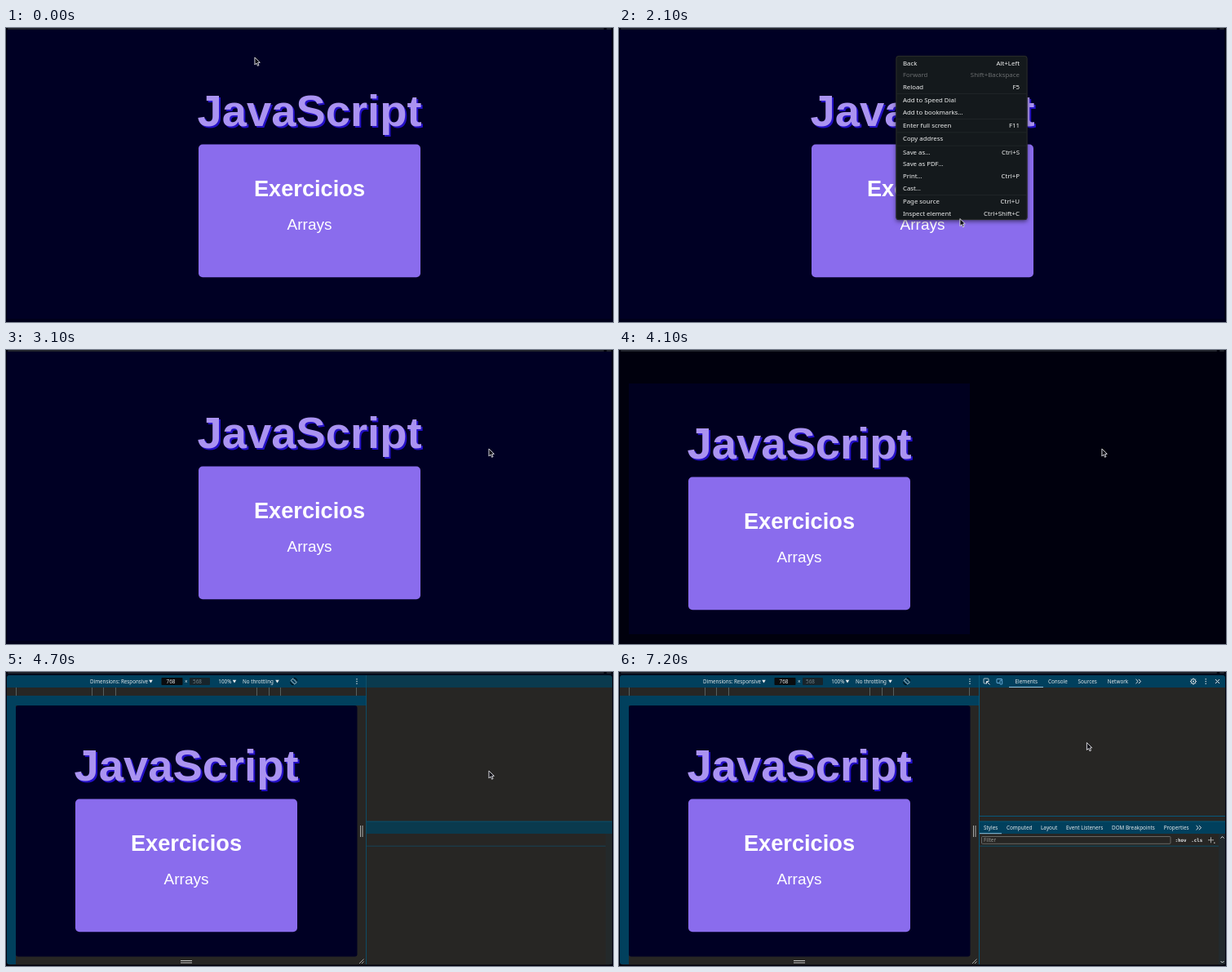
These frames come from a looping animation (744x360 px, 8000 ms). An HTML page with a canvas:

```html
<!DOCTYPE html>
<html lang="en">
<head>
<meta charset="utf-8">
<title>Opening the inspector</title>
<style>
html, body { margin: 0; width: 100%; height: 100%; overflow: hidden; background: #000024; }
canvas { display: block; }
</style>
</head>
<body>
<canvas id="stage" width="744" height="360"></canvas>
<script>
const ctx = document.getElementById('stage').getContext('2d');
const LOOP = 8000, STEP = 100;
const NAVY = '#000024', TEAL = '#01405d', GRAY = '#272624', LINE = '#07587b';
const SANS = '"Liberation Sans", Arial, sans-serif';
const UI = '"Noto Sans", "Open Sans", sans-serif';
const MONO = '"DejaVu Sans Mono", monospace';

const cursorPath = [
  [0, 304.5, 35.5], [100, 310, 49], [200, 328, 84], [300, 339, 105],
  [900, 339, 105], [1600, 414, 250], [1700, 414, 250], [1800, 418, 244],
  [2000, 418, 244], [2100, 417.5, 233], [2200, 417.5, 233], [2600, 591.5, 120.5],
  [7100, 591.5, 120.5], [7200, 573, 86], [8000, 573, 86]
];

const menu = [
  ['Back', 'Alt+Left', 43], ['Forward', 'Shift+Backspace', 57.5], ['Reload', 'F5', 72],
  ['Add to Speed Dial', '', 88.5], ['Add to bookmarks…', '', 103],
  ['Enter full screen', 'F11', 119.3], ['Copy address', '', 135.6],
  ['Save as…', 'Ctrl+S', 152], ['Save as PDF…', '', 166.6], ['Print…', 'Ctrl+P', 181.2],
  ['Cast…', '', 196], ['Page source', 'Ctrl+U', 212], ['Inspect element', 'Ctrl+Shift+C', 226.7]
];

const ramp = (t, from, to) => Math.max(0, Math.min(1, (t - from) / (to - from)));

function rect(x, y, w, h, fill, r = 0) {
  ctx.fillStyle = fill;
  ctx.beginPath();
  ctx.roundRect(x, y, w, h, r);
  ctx.fill();
}

function frame(x, y, w, h, color, r = 0) {
  ctx.strokeStyle = color;
  ctx.lineWidth = 0.8;
  ctx.beginPath();
  ctx.roundRect(x, y, w, h, r);
  ctx.stroke();
}

function line(points, color = '#dfe3e6', width = 1) {
  ctx.strokeStyle = color;
  ctx.lineWidth = width;
  ctx.beginPath();
  points.forEach(([x, y], i) => i ? ctx.lineTo(x, y) : ctx.moveTo(x, y));
  ctx.stroke();
}

function text(str, x, y, font, color = '#e6e9ec', align = 'left') {
  ctx.font = font;
  ctx.fillStyle = color;
  ctx.textAlign = align;
  ctx.fillText(str, x, y);
}

// Small interface label, placed by its vertical middle.
const label = (str, x, mid, color, align, size = 6.35) =>
  text(str, x, mid + size * 0.37, `500 ${size}px ${UI}`, color, align);

function withAlpha(a, draw) {
  if (a <= 0) return;
  ctx.save();
  ctx.globalAlpha = a;
  draw();
  ctx.restore();
}

function pageContent(dx, dy) {
  const cx = 372 + dx;
  const title = `bold 54.4px ${SANS}`;
  text('JavaScript', cx + 2, 122 + dy, title, '#2410c6', 'center');
  text('JavaScript', cx, 120 + dy, title, '#aa93f1', 'center');
  rect(cx - 136, 142.5 + dy, 272, 162.7, '#8a6ced', 5);
  text('Exercicios', cx, 206.3 + dy, `bold 27.2px ${SANS}`, '#fff', 'center');
  text('Arrays', cx, 246.5 + dy, `19px ${SANS}`, '#fff', 'center');
}

function windowEdge() {
  rect(0, 0, 744, 2, '#03040c');
  rect(2, 0, 731, 2, '#20232c', 1);
  rect(736, 0, 6, 2, '#20232c', 1);
}

function fullPage() {
  rect(0, 0, 744, 360, NAVY);
  rect(0, 0, 1, 360, '#02020f');
  rect(742.5, 0, 1.5, 360, '#02020f');
  rect(0, 356, 744, 4, '#00001a');
  windowEdge();
  pageContent(0, 0);
}

function contextMenu() {
  ctx.save();
  ctx.shadowColor = 'rgba(0,0,0,.5)';
  ctx.shadowBlur = 5;
  ctx.shadowOffsetY = 2;
  rect(339.5, 34, 161, 201, '#14191c', 3);
  ctx.restore();
  frame(339.9, 34.4, 160.2, 200.2, '#30332f', 3);
  for (const y of [80.3, 111.2, 127.5, 143.8, 204.1]) rect(340.5, y, 159, 0.7, '#23282b');
  for (const [name, keys, y] of menu) {
    const color = name === 'Forward' ? '#6a6d6f' : '#f0f1f1';
    label(name, 348, y, color, 'left', 7.8);
    label(keys, 491, y, color, 'right', 7.9);
  }
}

function triangle(x, y) {
  ctx.fillStyle = '#e6e9ec';
  ctx.beginPath();
  ctx.moveTo(x - 2.3, y - 1.7);
  ctx.lineTo(x + 2.3, y - 1.7);
  ctx.lineTo(x, y + 2);
  ctx.fill();
}

function kebab(x, y) {
  for (const d of [-2.8, 0, 2.8]) rect(x - 0.7, y + d - 0.7, 1.4, 1.4, '#e6e9ec', 0.7);
}

function chevrons(x, y) {
  for (const d of [0, 3.4]) line([[x + d, y - 2.6], [x + d + 2.7, y], [x + d, y + 2.6]]);
}

function gear(x, y) {
  ctx.strokeStyle = '#dfe3e6';
  ctx.lineWidth = 1;
  ctx.beginPath();
  ctx.arc(x, y, 2.9, 0, 7);
  ctx.stroke();
  for (let i = 0; i < 8; i++) {
    const c = Math.cos(i * Math.PI / 4), s = Math.sin(i * Math.PI / 4);
    line([[x + c * 2.9, y + s * 2.9], [x + c * 4, y + s * 4]]);
  }
  rect(x - 1, y - 1, 2, 2, '#dfe3e6', 1);
}

function rotateIcon(x, y) {
  ctx.save();
  ctx.translate(x, y);
  ctx.rotate(-Math.PI / 4);
  frame(-1.7, -3.2, 3.4, 6.4, '#dfe3e6', 0.5);
  ctx.restore();
  for (const a of [-1.5, 1.64]) {
    ctx.beginPath();
    ctx.arc(x, y, 4.3, a, a + 1.3);
    ctx.stroke();
  }
}

function deviceBar() {
  rect(1, 4, 440.5, 15, TEAL, [3, 0, 0, 0]);
  rect(1, 29, 440.5, 12, TEAL);
  rect(1, 29, 11, 329, TEAL, [0, 0, 0, 3]);
  for (const x of [12.5, 105.5, 119.5, 134.5, 307.5, 322.5, 336.5, 429.5])
    rect(x - 0.5, 19, 1, 10, '#56605f');
  label('Dimensions: Responsive', 103, 11.5, undefined, 'left', 6.25);
  triangle(177.5, 11.5);
  rect(190.5, 7, 26, 9, '#0a0c0e', 1);
  label('768', 202, 11.6, '#e6e9ec', 'center');
  label('×', 220.7, 11.5, '#e6e9ec', 'center');
  rect(225, 7, 25, 9, '#17242b', 1);
  label('568', 234.5, 11.6, '#718087', 'center');
  label('100%', 260.3, 11.5);
  triangle(280, 11.5);
  label('No throttling', 290, 11.5, undefined, 'left', 6.25);
  triangle(332.5, 11.5);
  rotateIcon(352.7, 11.5);
  kebab(430, 11.5);
  for (const d of [0, 2.5]) {
    rect(434 + d, 188, 1, 14, '#a9aaa9');
    rect(214, 353 + d, 14, 1, '#c4c5c4');
  }
  line([[433, 357], [438.5, 351.5]], '#a9aaa9');
  line([[436, 357], [438.5, 354.5]], '#a9aaa9');
}

function panelBars() {
  rect(442, 4, 301, 15, TEAL, [0, 3, 0, 0]);
  rect(442, 183, 301, 15, TEAL);
  rect(441, 4, 1, 354, LINE);
  rect(442, 182.6, 301, 0.8, LINE);
  rect(442, 212.7, 293, 0.9, LINE);
  rect(735, 198, 8, 160, '#222a2d');
}

function panelText() {
  frame(447, 8, 6, 6, '#dfe3e6', 0.8);
  rect(450, 11, 5, 5, TEAL);
  line([[454.5, 15.5], [450.5, 11.5], [450.5, 14.5]]);
  line([[450.5, 11.5], [453.5, 11.5]]);
  frame(463, 8.5, 6.5, 5, '#7fc4f5', 0.5);
  rect(466.5, 10, 3.5, 5.5, TEAL);
  frame(467, 10.3, 2.7, 4.7, '#7fc4f5', 0.4);
  label('Elements', 485.5, 11.5);
  rect(478, 18, 42, 1, '#8fc6e4');
  label('Console', 526, 11.5);
  label('Sources', 562.5, 11.5);
  label('Network', 598.7, 11.5);
  chevrons(633.5, 11.5);
  gear(704, 11.5);
  kebab(719.2, 11.5);
  line([[731, 9], [736, 14]]);
  line([[736, 9], [731, 14]]);

  const tabs = [['Styles', 447], ['Computed', 475], ['Layout', 517],
    ['Event Listeners', 548], ['DOM Breakpoints', 604], ['Properties', 667.7]];
  for (const [name, x] of tabs) label(name, x, 190.7);
  rect(442, 197.2, 27, 1, '#8fc6e4');
  chevrons(707.5, 190.7);
  frame(444.5, 201.5, 231.5, 8.8, '#777875', 1);
  label('Filter', 447, 206, '#989996');
  text(':hov', 681.5, 208.2, `bold 5.8px ${MONO}`);
  text('.cls', 701.2, 208.2, `bold 5.8px ${MONO}`);
  line([[722, 205.8], [729, 205.8]], '#a5a6a4');
  line([[725.5, 202.3], [725.5, 209.3]], '#a5a6a4');
  rect(729, 208.5, 1.5, 1.5, '#a5a6a4');
  line([[737.5, 203.5], [739.5, 201.5], [741.5, 203.5]]);
  line([[737.5, 354], [739.5, 356], [741.5, 354]]);
}

function inspector(t) {
  rect(0, 0, 744, 360, '#00000d');
  windowEdge();
  if (t < 4200) {
    rect(12, 41, 418, 307, '#00001f');
  } else {
    rect(0, 2, 744, 2, '#020a1b');
    rect(1, 4, 742, 354.5, GRAY, 4);
    withAlpha(ramp(t, 4200, 4500), deviceBar);
    withAlpha(ramp(t, 4400, 4800), panelBars);
    withAlpha(ramp(t, 5000, 5300), panelText);
    if (t >= 5300 && t < 6000) triangle(690.5, 11.5);
    withAlpha(ramp(t, 5900, 6100), () => rect(442, 176, 301, 0.9, LINE));
    rect(12, 41, 418.5, 307.5, NAVY, 3);
  }
  pageContent(-151, 13);
}

function cursor(t) {
  const i = cursorPath.findIndex((k, n) => n && t <= k[0]);
  const [t0, x0, y0] = cursorPath[i - 1], [t1, x1, y1] = cursorPath[i];
  const p = ramp(t, t0, t1);
  ctx.save();
  ctx.translate(x0 + (x1 - x0) * p, y0 + (y1 - y0) * p);
  ctx.beginPath();
  for (const [x, y] of [[0.4, 0.5], [0.4, 9.5], [2.5, 7.6], [4, 10.8], [5.5, 10.1], [4.1, 7], [6.8, 6.8]])
    ctx.lineTo(x, y);
  ctx.closePath();
  ctx.fillStyle = '#101018';
  ctx.fill();
  ctx.strokeStyle = '#e4e4e8';
  ctx.lineWidth = 0.9;
  ctx.stroke();
  ctx.restore();
}

function draw(now) {
  const t = Math.floor((now % LOOP) / STEP) * STEP;
  if (t < 4100) {
    fullPage();
    withAlpha(Math.min(ramp(t, 700, 900), 1 - ramp(t, 2100, 2300)), contextMenu);
  } else {
    inspector(t);
  }
  cursor(t);
}

const start = performance.now();
function tick() {
  draw(performance.now() - start);
  requestAnimationFrame(tick);
}
tick();
</script>
</body>
</html>
```
